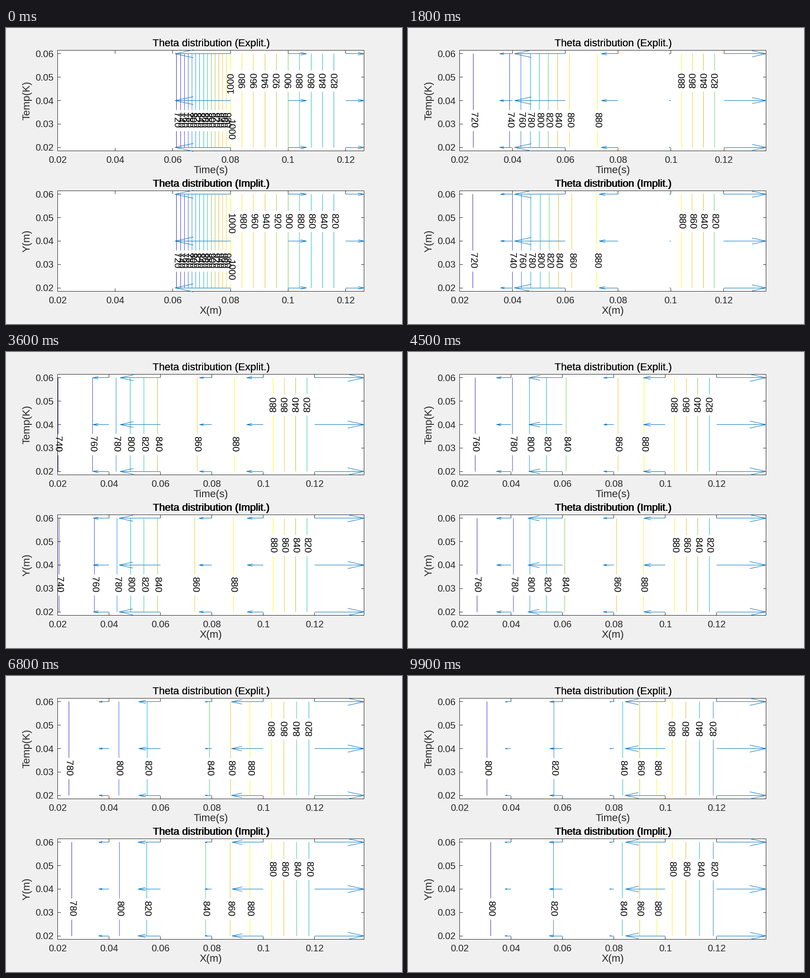
Recreate the animation shown at these times as a matplotlib script. Size 840 px wide and 630 px high, loop 10000 ms.

```python
import numpy as np
import matplotlib.pyplot as plt
from matplotlib.animation import FuncAnimation
from matplotlib.collections import LineCollection
from matplotlib.colors import LinearSegmentedColormap

W, H, DPI = 840, 630, 100
PX = 72 / DPI
STEPS = 100
# Pixel columns and rows of the upper axes; straight lines snap to them
LEFT, RIGHT, TOP, BOTTOM = 109, 759, 47, 261
MIDDLE, REACH = 154, 99.6
ROWS = (MIDDLE - REACH, MIDDLE, MIDDLE + REACH)
NODES = np.arange(1, 7) * 0.02
MAX_ARROW = 0.9 * np.hypot(0.1 / 6, 0.04 / 3)
INK, BLUE = "#262626", (0, 0.447, 0.741)

plt.rcParams["font.family"] = "Liberation Sans"

PARULA = LinearSegmentedColormap.from_list("parula", [
    (0, (.242, .150, .660)), (.175, (.281, .323, .958)),
    (.286, (.179, .529, .968)), (.429, (.069, .695, .839)),
    (.476, (.007, .731, .766)), (.571, (.216, .784, .592)),
    (.683, (.562, .794, .305)), (.762, (.820, .750, .154)),
    (.825, (.973, .730, .239)), (.889, (.989, .814, .189)),
    (1, (.977, .984, .081))])


def heat_matrix(fast=0.0245, slow=0.00087):
    """Exchange between nodes of a three-layer wall, insulated at both ends."""
    to_left = np.array([fast, 2 * fast, 0.0548, slow, 2 * slow])
    to_right = np.array([2 * fast, fast, 0.133, 2 * slow, slow])
    m = np.diag(to_left, -1) + np.diag(to_right, 1)
    return m - np.diag(m.sum(axis=1))


def simulate(step):
    temps = [np.array([700., 700, 700, 1000, 900, 800])]
    for _ in range(STEPS - 1):
        temps.append(step @ temps[-1])
    return temps


def crossings(temp):
    """Contour levels as (level, x, rising), from left to right."""
    found = []
    for x, a, b in zip(NODES, temp, temp[1:]):
        lo, hi = min(a, b), max(a, b)
        for v in range(700, 1020, 20):
            if lo < v <= hi:
                found.append((v, x + 0.02 * (v - a) / (b - a), b > a))
    return sorted(found, key=lambda c: c[1])


def arrow(x, y, length):
    tip, back, half = x + length, x + 0.67 * length, 0.072 * abs(length)
    shaft = np.array([(x, y), (tip, y)])
    head = np.array([(back, y - half), (tip, y), (back, y + half)])
    return [shaft, head + 0.5]


fig = plt.figure(figsize=(W / DPI, H / DPI), dpi=DPI, facecolor="#f0f0f0")
ax = fig.add_axes((0, 0, 1, 1))
ax.set_xlim(0, W)
ax.set_ylim(H, 0)
ax.axis("off")


def write(x, y, text="", size=20, color=INK, **kw):
    kw = {"ha": "center", "va": "baseline", "rotation_mode": "anchor",
          "zorder": 6, **kw}
    return ax.text(x, y, text, fontsize=size * PX, color=color, **kw)


def strokes(color, z, width=1):
    lines = LineCollection([], colors=color, linewidths=width * PX, zorder=z)
    return ax.add_collection(lines)


class Panel:
    def __init__(self, dy, title, xlabel, ylabel, temps, falling_turn):
        self.dy, self.temps, self.falling_turn = dy, temps, falling_turn
        for fill, edge, z in (("white", "none", 0), ("none", INK, 4)):
            ax.add_patch(plt.Rectangle(
                (LEFT, TOP + dy), RIGHT - LEFT, BOTTOM - TOP,
                fc=fill, ec=edge, lw=PX, zorder=z))
        mid = (LEFT + RIGHT) / 2 + 0.5
        for shift in (0.5, 1.1):
            write(mid + shift, 39 + dy, title, 22, "black")
        write(mid, 309 + dy, xlabel, 22)
        write(51, 154.5 + dy, ylabel, 22, rotation=90)
        marks = []
        for i in range(5):
            y = MIDDLE + REACH * (1 - i / 2) + dy
            marks += [[(LEFT, y), (LEFT + 6.5, y)],
                      [(RIGHT, y), (RIGHT - 6.5, y)]]
            write(101.5, y + 7.5, f"{0.02 + 0.01 * i:.2f}", ha="right")
        strokes(INK, 4).set_segments(marks)
        self.ticks = strokes(INK, 4)
        self.names = [write(0, 287 + dy, f"{x:.2g}") for x in NODES]
        self.contours = strokes("k", 1)
        self.gaps = strokes("white", 2, 3)
        self.arrows = strokes(BLUE, 5)
        self.labels = [write(0, 0, color="black") for _ in range(32)]

    def draw(self, frame):
        temp, dy = self.temps[frame], self.dy
        rise = np.diff(temp)
        flow = -rise / np.abs(rise).max() * MAX_ARROW
        scale = (RIGHT - LEFT) / (0.1 + flow[-1])
        px = LEFT + (NODES - 0.02) * scale

        marks = []
        for x, name in zip(px, self.names):
            marks += [[(x, TOP + dy), (x, TOP + dy + 6.5)],
                      [(x, BOTTOM + dy), (x, BOTTOM + dy - 6.5)]]
            name.set_x(x + 0.5)
        self.ticks.set_segments(marks)

        self.arrows.set_segments([
            part for x, f in zip(px[1:], flow) if abs(f) > 1e-9
            for y in ROWS for part in arrow(x, y + dy, f * scale)])
        self.draw_contours(crossings(temp), scale)

    def draw_contours(self, found, scale):
        dy = self.dy
        levels = np.array([v for v, _, _ in found])
        lines, gaps = [], []
        for label in self.labels:
            label.set_text("")
        for (v, x, rising), label in zip(found, self.labels):
            x = LEFT + (x - 0.02) * scale
            wide = v >= 1000
            y = (174 + 15 * wide if rising else 90) + dy
            size = 56 if wide else 45
            lines.append([(x, ROWS[0] + dy), (x, ROWS[2] + dy)])
            gaps.append([(x, y), (x, y + size)])
            turn = -90 if rising else self.falling_turn
            label.set_text(str(v))
            label.set_rotation(turn)
            label.set_position((x + (7.3 if turn > 0 else -5.3),
                                y + size / 2 - 1))
        self.contours.set_segments(lines)
        self.contours.set_color(
            PARULA((levels - levels.min()) / np.ptp(levels)))
        self.gaps.set_segments(gaps)


EYE, FLOW = np.eye(6), heat_matrix()
panels = [
    Panel(0, "Theta distribution (Explit.)", "Time(s)", "Temp(K)",
          simulate(EYE + FLOW), 90),
    Panel(299, "Theta distribution (Implit.)", "X(m)", "Y(m)",
          simulate(np.linalg.inv(EYE - FLOW)), -90)]


def update(frame):
    for panel in panels:
        panel.draw(frame)
    return []


anim = FuncAnimation(fig, update, frames=STEPS, interval=100,
                     repeat=True, repeat_delay=0, blit=False)
plt.show()
```
